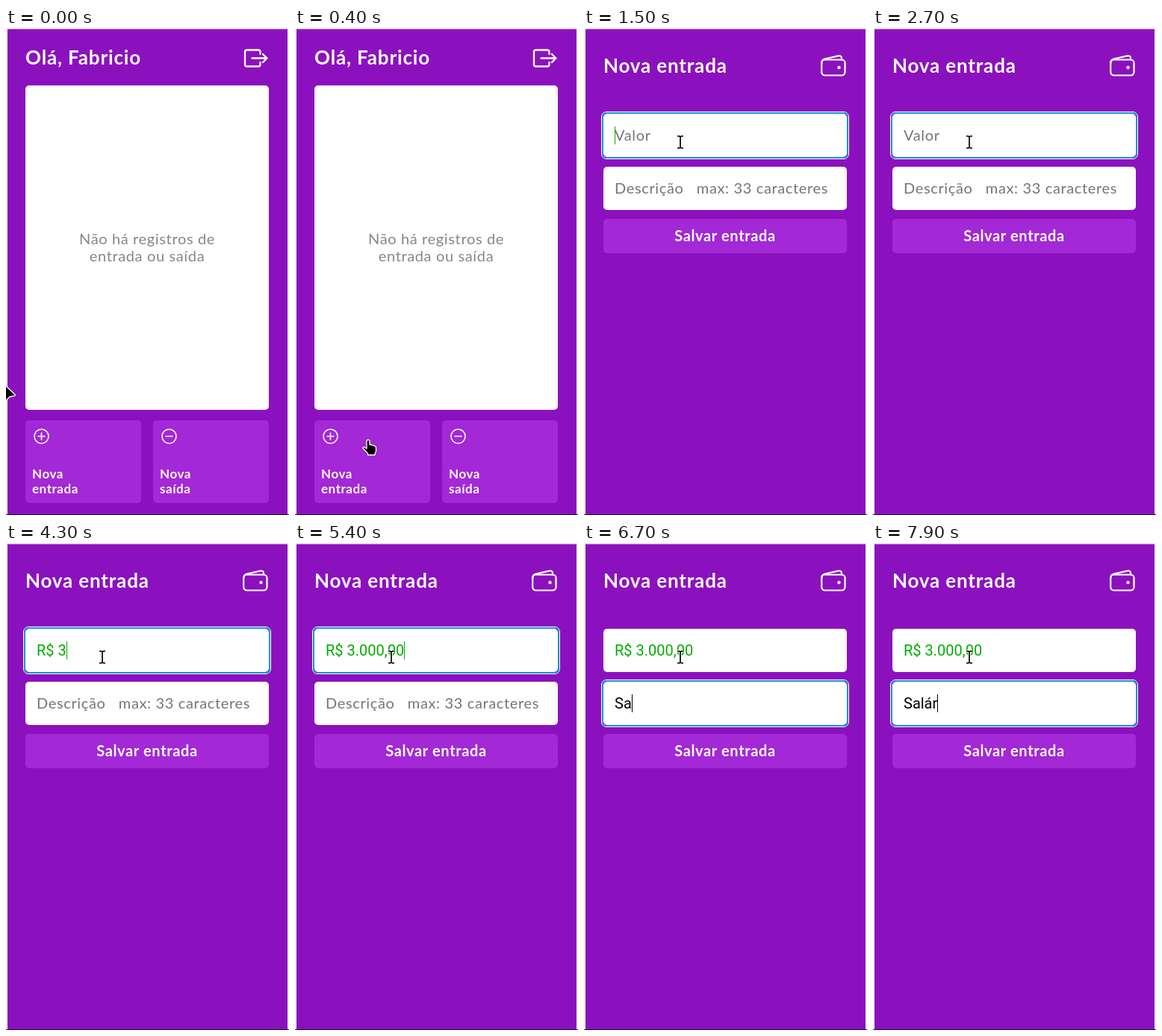
An HTML page that plays this animation: 379 by 653 pixels, repeating every 8000 ms.

```html
<!DOCTYPE html>
<html lang="pt-BR">
<head>
<meta charset="utf-8">
<title>Nova entrada</title>
<style>
  html, body { margin: 0; width: 100%; height: 100%; overflow: hidden; background: #fff; }
  svg { display: block; width: 379px; height: 653px; }
  text { font-family: Lato, "Open Sans", sans-serif; letter-spacing: .032em; font-size: 20px; fill: #fff; }
  .title { font-size: 26px; font-weight: 700; }
  .bold { font-weight: 700; }
  .small { font-size: 17px; font-weight: 700; }
  .mid { text-anchor: middle; }
  .empty { fill: #868686; }
  .hint { fill: #757575; }
  .value { font-family: Roboto, Arial, sans-serif; letter-spacing: 0; }
  .button { fill: #a328d6; }
  .line { fill: none; stroke: #fff; stroke-linecap: round; stroke-linejoin: round; }
  .pointer { fill: #000; stroke: #fff; stroke-width: 1.3; stroke-linejoin: round; }
</style>
</head>
<body>
<svg viewBox="0 0 379 653">
  <rect width="379" height="653" fill="#f6eefa"/>
  <rect x="2" y="1.5" width="375" height="651.5" fill="#8c11be"/>

  <g id="home">
    <text class="title" x="26" y="49">Olá, Fabricio</text>
    <g class="line" stroke-width="2.3">
      <path d="M340.5 35V32q0-2.5-2.5-2.5H322.500q-2.500 0-2.500 2.500V49q0 2.500 2.500 2.500H338q2.500 0 2.500-2.500V46"/>
      <path d="M329.500 40.500H349M344 35l5.500 5.500-5.500 5.500"/>
    </g>
    <rect x="26" y="77" width="326" height="435" rx="5" fill="#fff"/>
    <text class="empty mid" x="189" y="290">Não há registros de</text>
    <text class="empty mid" x="189" y="313">entrada ou saída</text>
    <rect class="button" x="26" y="526" width="155" height="111" rx="5"/>
    <rect class="button" x="197" y="526" width="155" height="111" rx="5"/>
    <g class="line" stroke-width="1.600">
      <circle cx="47.500" cy="547.500" r="9.500"/>
      <path d="M43 547.500h9M47.500 543v9"/>
      <circle cx="218.500" cy="547.500" r="9.500"/>
      <path d="M214 547.500h9"/>
    </g>
    <text class="small" x="35" y="604">Nova</text>
    <text class="small" x="35" y="624">entrada</text>
    <text class="small" x="206" y="604">Nova</text>
    <text class="small" x="206" y="624">saída</text>
  </g>

  <g id="form">
    <text class="title" x="26" y="60">Nova entrada</text>
    <g class="line" stroke-width="2.2">
      <rect x="318.200" y="42.500" width="31.300" height="21" rx="4.500"/>
      <path d="M318.200 47.500q0-5 4-6l18.500-4.100q4.300-.8 4.300 3.300v1.800"/>
    </g>
    <circle cx="341.500" cy="53" r="2.200" fill="#fff"/>
    <rect x="26" y="115" width="326" height="58" rx="5" fill="#fff"/>
    <rect x="26" y="186" width="326" height="58" rx="5" fill="#fff"/>
    <g id="ring" fill="none">
      <rect x="23.500" y="112.500" width="331" height="63" rx="6.500" stroke="#fff"/>
      <rect x="25" y="114" width="328" height="60" rx="5" stroke="#1a91d1" stroke-width="2"/>
    </g>
    <text class="hint" id="hint0" x="41" y="151">Valor</text>
    <text class="hint" id="hint1" x="41" y="222">Descrição&#160;&#160;&#160;max: 33 caracteres</text>
    <text class="value" id="value0" x="41" y="151" style="fill:#03ac00"></text>
    <text class="value" id="value1" x="41" y="222" style="fill:#000"></text>
    <rect id="caret" width="1" height="24"/>
    <rect class="button" x="26" y="256" width="326" height="46" rx="5"/>
    <text class="bold mid" x="189" y="286">Salvar entrada</text>
  </g>

  <path class="pointer" id="arrow" d="M.7 1.500Q.7 0 1.900 1L16 14.500Q17 15.800 15.200 16.200L9 17.500 2.600 23.300Q.7 24.500.7 22.500Z"/>
  <path class="pointer" id="hand" d="M-1 2.200Q-1 .2 1 .2T3 2.200V7Q5 6 6.300 7.500 8.300 6.800 9.300 8.500 11.500 8.300 11.500 11V15Q11.500 17 10 18.500V20.500H.5V18.500L-5.800 11.800Q-6.500 9.800-4.300 9.800L-1 12Z"/>
  <g id="beam" fill="none">
    <path d="M-4-8h2.500L0-7 1.500-8H4M-4 8h2.500L0 7 1.500 8H4M0-7V7" stroke="#fff" stroke-width="3.600"/>
    <path d="M-4-8h2.500L0-7 1.500-8H4M-4 8h2.500L0 7 1.500 8H4M0-7V7" stroke="#000" stroke-width="1.700"/>
  </g>
  <rect y="652" width="379" height="1" fill="#1d1420"/>
</svg>
<script>
const LOOP = 8000;
const el = id => document.getElementById(id);

// time, pointer kind, x, y
const moves = [
  [0, "arrow", -4, 477], [100, "arrow", 24, 495], [200, "arrow", 58, 521],
  [300, "hand", 86, 543], [400, "hand", 97, 552],
  [800, "arrow", 98, 546], [900, "arrow", 99, 528], [1000, "arrow", 104, 466],
  [1100, "arrow", 112, 368], [1200, "hand", 120, 268], [1300, "beam", 126, 194],
  [1400, "beam", 129, 159], [1500, "beam", 129, 153]
];

// time, focused field (-1 for none), its value, caret shown
const edits = [
  [0, -1, "", 0], [1500, 0, "", 1], [2200, 0, "R$ 3", 1], [2500, 0, "", 1],
  [2700, 0, "", 0], [3900, 0, "", 1], [4300, 0, "R$ 3", 1], [4600, 0, "R$ 30", 1],
  [4700, 0, "R$ 3,00", 1], [4900, 0, "R$ 30,00", 1], [5100, 0, "R$ 300,00", 1],
  [5400, 0, "R$ 3.000,00", 1], [5800, 1, "", 1], [6200, 1, "S", 1], [6700, 1, "Sa", 1],
  [6900, 1, "Sal", 0], [7000, 1, "Sal", 1], [7400, 1, "Sal´", 1],
  [7600, 1, "Salá", 1], [7900, 1, "Salár", 1]
];

const at = (steps, t) => steps.findLast(step => step[0] <= t);
const show = (id, on) => el(id).style.display = on ? "" : "none";

function drawPointer(t) {
  const [, kind, x, y] = at(moves, t);
  for (const id of ["arrow", "hand", "beam"]) show(id, id === kind);
  el(kind).setAttribute("transform", `translate(${x} ${y})`);
}

function drawFields(t) {
  const [, focus, value, caret] = at(edits, t);
  const amount = at(edits.filter(step => step[1] < 1), t)[2];
  [amount, focus === 1 ? value : ""].forEach((text, i) => {
    el("value" + i).textContent = text;
    show("hint" + i, !text);
  });
  show("ring", focus >= 0);
  show("caret", caret);
  if (focus < 0) return;
  el("ring").setAttribute("transform", `translate(0 ${focus * 71})`);
  const width = value ? el("value" + focus).getComputedTextLength() : 0;
  el("caret").setAttribute("x", Math.round(41 + width));
  el("caret").setAttribute("y", 132 + focus * 71);
  el("caret").setAttribute("fill", focus ? "#000" : "#03ac00");
}

const start = performance.now();
function draw() {
  const t = (performance.now() - start) % LOOP;
  show("home", t < 800);
  show("form", t >= 800);
  drawPointer(t);
  drawFields(t);
  requestAnimationFrame(draw);
}
draw();
</script>
</body>
</html>
```
